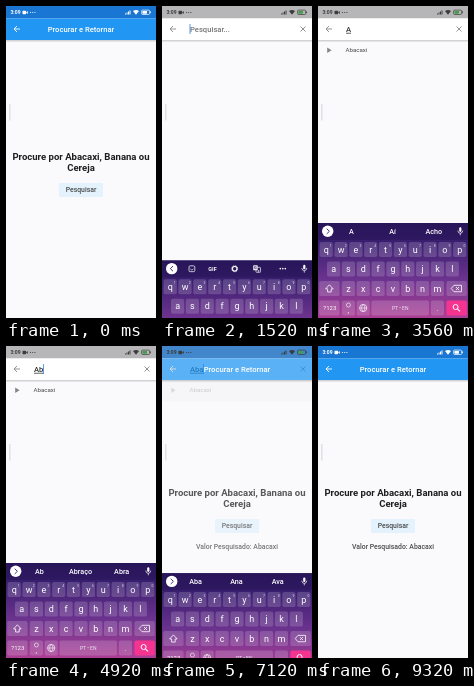
These frames come from a looping animation (150x312 px, 9.6 s). An HTML page:

```html
<!DOCTYPE html>
<html lang="pt">
<head>
<meta charset="utf-8">
<title>Procurar e Retornar</title>
<style>
html, body { margin: 0; width: 100%; height: 100%; overflow: hidden; background: #faf9fc; }
svg { display: block; width: 150px; height: 312px; }
text { font-family: Roboto, "Noto Sans", sans-serif; white-space: pre; }
</style>
</head>
<body>
<svg id="stage" viewBox="0 0 150 312"></svg>
<script>
const LOOP = 9600;
const rect = (x, y, w, h, fill, r = 0, more = '') =>
  `<rect x="${x}" y="${y}" width="${w}" height="${h}" rx="${r}" fill="${fill}" ${more}/>`;
const text = (s, x, y, size, fill, weight = 500, anchor = 'middle', more = '') =>
  `<text x="${x}" y="${y}" font-size="${size}" fill="${fill}" font-weight="${weight}" text-anchor="${anchor}" ${more}>${s}</text>`;
const line = (d, color, width = 1) =>
  `<path d="${d}" fill="none" stroke="${color}" stroke-width="${width}"/>`;
const dot = (x, y, r, fill, more = '') => `<circle cx="${x}" cy="${y}" r="${r}" fill="${fill}" ${more}/>`;
const backArrow = color => line('M14 23H8M11 20L8 23L11 26', color, .9);
const fruits = ['Abacaxi', 'Banana', 'Cereja'];

const defs = `<defs>
  <linearGradient id="shade" x2="0" y2="1"><stop stop-color="#000" stop-opacity=".2"/><stop offset="1" stop-opacity="0"/></linearGradient>
  <linearGradient id="board" gradientUnits="userSpaceOnUse" x1="0" y1="217" x2="0" y2="312">
    <stop stop-color="#2b1760"/><stop offset=".2" stop-color="#3a1f70"/><stop offset=".6" stop-color="#6c338f"/><stop offset="1" stop-color="#ab3f95"/>
  </linearGradient>
  <clipPath id="inButton">${rect(53, 177, 44, 14, '#000', 1)}</clipPath>
  <clipPath id="inRow">${rect(0, 34, 150, 21.5, '#000')}</clipPath>
</defs>`;

const home = rect(0, 0, 150, 312, '#faf9fc') + rect(0, 34, 150, 2.5, 'url(#shade)') +
  rect(0, 0, 150, 12.5, '#1976d2') + rect(0, 12.5, 150, 21.5, '#2196f3') +
  backArrow('#fff') + text('Procurar e Retornar', 75, 25.8, 7.64, '#fff') +
  '<g id="content">' +
  text('Procure por Abacaxi, Banana ou', 75, 153.5, 9.55, '#1e1e1e', 700) +
  text('Cereja', 75, 164.7, 9.55, '#1e1e1e', 700) +
  rect(53, 177, 44, 14, '#e3f2fd', 1) +
  `<g clip-path="url(#inButton)">${dot(75, 184, 0, '#1976d2', 'id="buttonInk"')}</g>` +
  text('Pesquisar', 75, 186.4, 6.87, '#4a4a4a') +
  text('Valor Pesquisado: Abacaxi', 75, 207.3, 6.87, '#4a4a4a', 500, 'middle', 'id="result"') + '</g>';

const search = rect(0, 0, 150, 312, '#faf9fc') + rect(0, 34, 150, 2.5, 'url(#shade)') +
  rect(0, 0, 150, 12.5, '#b6b6b8') + rect(0, 12.5, 150, 21.5, '#fff') +
  backArrow('#8a8a8a') + line('M138.5 20.5L143.5 25.5M143.5 20.5L138.5 25.5', '#777', .8) +
  text('Pesquisar...', 28, 25.8, 7.64, '#777', 500, 'start', 'id="hint"') +
  text('', 28, 25.8, 7.64, '#333', 500, 'start', 'id="query" text-decoration="underline"') +
  rect(27.6, 18, .8, 10, '#2b7fe0', 0, 'id="caret"') +
  `<g clip-path="url(#inRow)">${dot(44, 44, 0, '#000', 'id="rowInk"')}</g>` +
  fruits.map((name, i) => {
    const y = 44.3 + i * 21.4;
    return `<g class="fruit"><path d="M9.2 ${y - 2.7}L13.6 ${y}L9.2 ${y + 2.7}Z" fill="#858585"/>` +
      text(name, 27.5, y + 2.1, 6.11, '#444', 400, 'start') + '</g>';
  }).join('');

// Everything here inherits its colour so the bar can switch between light and dark icons.
const status = text('3:09', 4.5, 8.3, 5, 'currentColor', 700, 'start') +
  rect(16.5, 4.8, 3.6, 3.4, 'currentColor', .7) + '<path d="M20 6.5L21.8 5V8Z" fill="currentColor"/>' +
  [24.5, 26.7, 28.9].map(x => dot(x, 6.5, .6, 'currentColor')).join('') +
  [0, 1, 2, 3].map(i => rect(119 + i * 1.5, 7.5 - i, 1, 1 + i, 'currentColor')).join('') +
  '<path d="M127 5Q130 2.8 133 5L130 8.7Z" fill="currentColor"/>' +
  rect(135.6, 4.1, 8, 4.4, 'none', 1, 'stroke="currentColor" stroke-width=".7"') +
  rect(136.4, 4.9, 4.6, 2.8, 'currentColor', .4, 'id="charge"') + rect(144, 5.4, .8, 1.8, 'currentColor');

const keyPos = {};
const key = (x, y, w, fill = '#fff', opacity = .17) =>
  rect(x - w / 2, y - 7.5, w, 15, fill, 1.8, `fill-opacity="${opacity}"`);
function letters() {
  return [['qwertyuiop', 8.2, 243.5], ['asdfghjkl', 15.6, 263], ['zxcvbnm', 30.4, 282.5]].map(([row, x0, y], r) =>
    [...row].map((c, i) => {
      const x = x0 + i * 14.84;
      keyPos[c] = [x, y];
      return key(x, y, 13.2) + text(c, x, y + 3, 9, '#fff', 400, 'middle', 'class="letter"') +
        (r ? '' : text((i + 1) % 10, x + 4.6, y - 3, 3.4, '#e4daf2', 400));
    }).join('')).join('');
}
keyPos.shift = [11, 282.5];

const tools = '<g id="tools">' + line('M11 222.7L8.3 225.3L11 227.9', '#3a1f70', .9) +
  rect(27, 222.5, 5.8, 5.8, 'none', 1.2, 'stroke="#eee" stroke-width=".8"') + line('M28.3 225.5Q30 228 31.5 225.5', '#eee', .7) +
  text('GIF', 50.5, 227.4, 5.5, '#fff', 700) +
  dot(72.7, 225.4, 2.3, 'none', 'stroke="#eee" stroke-width="1.3"') +
  dot(72.7, 225.4, 3, 'none', 'stroke="#eee" stroke-width=".8" stroke-dasharray="1.2 1.15"') +
  rect(91.2, 222, 4.5, 5, '#eee', .6) + rect(94, 224, 4.5, 5, 'none', .6, 'stroke="#eee" stroke-width=".7"') +
  text('G', 93.4, 226, 4, '#3a1f70', 700) + text('x', 96.4, 228.2, 4, '#eee') +
  [118.3, 120.8, 123.3].map(x => dot(x, 225.3, .8, '#fff')).join('') + '</g>';

const words = '<g id="words">' + line('M8.7 222.7L11.4 225.3L8.7 227.9', '#3a1f70', .9) +
  [33.5, 74.5, 115.7].map(x => text('', x, 227.9, 7.2, '#fff', 500, 'middle', 'class="word"')).join('') + '</g>';

const mic = rect(141.2, 221.3, 2.2, 4.6, '#fff', 1.1) + line('M139.8 224.6Q140 227.3 142.3 227.3Q144.6 227.3 144.8 224.6M142.3 227.3V229.3', '#fff', .7);

const keyboard = rect(0, 217, 150, 96, 'url(#board)') + rect(0, 217, 150, 17, '#21124f', 0, 'fill-opacity=".4"') +
  dot(9.7, 225.3, 5.7, '#fff') + tools + words + mic + letters() +
  key(11.4, 282.5, 20.4) + line('M11.4 278.8L15.2 282.9H13.2V286H9.6V282.9H7.6Z', '#fff', .8) +
  key(138.6, 282.5, 20.4) + line('M133.2 282.5L136 279.3H143.5V285.7H136ZM138 281L141 284M141 281L138 284', '#fff', .8) +
  key(11.4, 302, 20.4) + text('?123', 11.8, 304.2, 6, '#fff', 400) +
  key(30.4, 302, 13.2) + dot(30.4, 299, 2, 'none', 'stroke="#fff" stroke-width=".6"') + text(',', 30.4, 306.5, 8, '#fff', 400) +
  key(45.2, 302, 13.2) + dot(45.2, 302, 3.6, 'none', 'stroke="#fff" stroke-width=".7"') +
  line('M41.6 302H48.8M45.2 298.4Q41.9 302 45.2 305.6Q48.5 302 45.2 298.4', '#fff', .6) +
  key(82.2, 302, 57.6) + text('PT • EN', 82.2, 304, 5, '#f0e4f4', 400) +
  key(119.4, 302, 13.2) + text('.', 119.4, 304.5, 8, '#fff', 400) +
  key(138.6, 302, 20.4, '#f5348f', 1) + dot(137.6, 301, 2.5, 'none', 'stroke="#fff" stroke-width="1"') + line('M139.4 302.8L142 305.4', '#fff', 1.1) +
  '<g id="press">' + rect(-6.6, -7.5, 13.2, 15, '#fff', 1.8, 'fill-opacity=".25"') +
  '<g id="popup">' + rect(-7.5, -27, 15, 19, '#7d57a8', 2.5) + text('', 0, -13.5, 11, '#fff', 400, 'middle', 'id="popLetter"') + '</g></g>';

document.getElementById('stage').innerHTML = defs + home + `<g id="search">${search}</g>` +
  `<g id="status">${status}</g>` + line('M3.8 98V114.5', '#dedde1', 1.4) + `<g id="keyboard">${keyboard}</g>` +
  dot(0, 0, 6, '#fff', 'id="touch" fill-opacity=".5" stroke="#000" stroke-opacity=".08" stroke-width=".8"');

const $ = id => document.getElementById(id);
const all = name => [...document.getElementsByClassName(name)];
const letterEls = all('letter'), wordEls = all('word'), fruitEls = all('fruit');
const ramp = (t, a, b) => Math.min(1, Math.max(0, (t - a) / (b - a)));
const within = (t, a, b) => t >= a && t < b;
const set = (id, attrs) => { for (const k in attrs) $(id).setAttribute(k, attrs[k]); };
const show = (el, on) => el.setAttribute('visibility', on ? 'inherit' : 'hidden');
const write = (el, s) => { if (el.textContent !== s) el.textContent = s; };

const presses = [[2600, 2700, 'shift'], [2880, 3000, 'a'], [4280, 4560, 'b'], [5200, 5320, 'a']];
const typed = [[1280, ''], [3000, 'A'], [4560, 'Ab'], [5320, 'Aba']];
const guesses = { A: ['A', 'Aí', 'Acho'], Ab: ['Ab', 'Abraço', 'Abra'], Aba: ['Aba', 'Ana', 'Ava'] };

function draw(t) {
  const done = t > 4000;
  set('search', { opacity: ramp(t, 980, 1280) - ramp(t, 6900, 7200) });
  set('content', { transform: `translate(0 ${done ? -4 : 0})` });
  show($('result'), done);
  const dark = within(t, 1260, 7200);
  set('status', { color: dark ? '#3c3c3c' : '#fff' });
  set('charge', { fill: dark ? '#459c4b' : 'currentColor' });

  set('buttonInk', { r: 26 * ramp(t, 400, 760), opacity: .13 * (1 - ramp(t, 760, 1000)) });
  set('rowInk', { r: 125 * ramp(t, 5900, 6140), opacity: .1 * (1 - .5 * ramp(t, 6560, 6860)) });

  const [since, query] = typed.filter(([at], i) => !i || t >= at).pop();
  write($('query'), query);
  show($('hint'), !query);
  const blink = Math.floor((t - since) / 560) % 2 === 0;
  show($('caret'), t >= since && (query === 'Aba' || blink));
  set('caret', { x: 27.6 + (query ? $('query').getComputedTextLength() : 0) });
  fruitEls.forEach((el, i) => show(el, query && fruits[i].includes(query)));

  const up = 1 - (1 - ramp(t, 1440, 1740)) ** 3, down = ramp(t, 7040, 7290) ** 2;
  set('keyboard', { transform: `translate(0 ${96 * (1 - up + down)})` });
  show($('tools'), !query);
  show($('words'), query);
  wordEls.forEach((el, i) => write(el, query ? guesses[query][i] : ''));
  const caps = within(t, 2700, 3000);
  letterEls.forEach(el => write(el, caps ? el.textContent.toUpperCase() : el.textContent.toLowerCase()));

  const press = presses.find(([a, b]) => within(t, a, b));
  show($('press'), press);
  let touch = within(t, 480, 720) ? [75, 184] : within(t, 5920, 6500) ? [44, 43.5] : null;
  if (press) {
    const name = press[2];
    touch = keyPos[name];
    set('press', { transform: `translate(${touch})` });
    show($('popup'), name.length === 1);
    write($('popLetter'), caps ? name.toUpperCase() : name);
  }
  show($('touch'), touch);
  if (touch) set('touch', { cx: touch[0], cy: touch[1] });
}

function tick() {
  draw(performance.now() % LOOP);
  requestAnimationFrame(tick);
}
tick();
</script>
</body>
</html>
```
